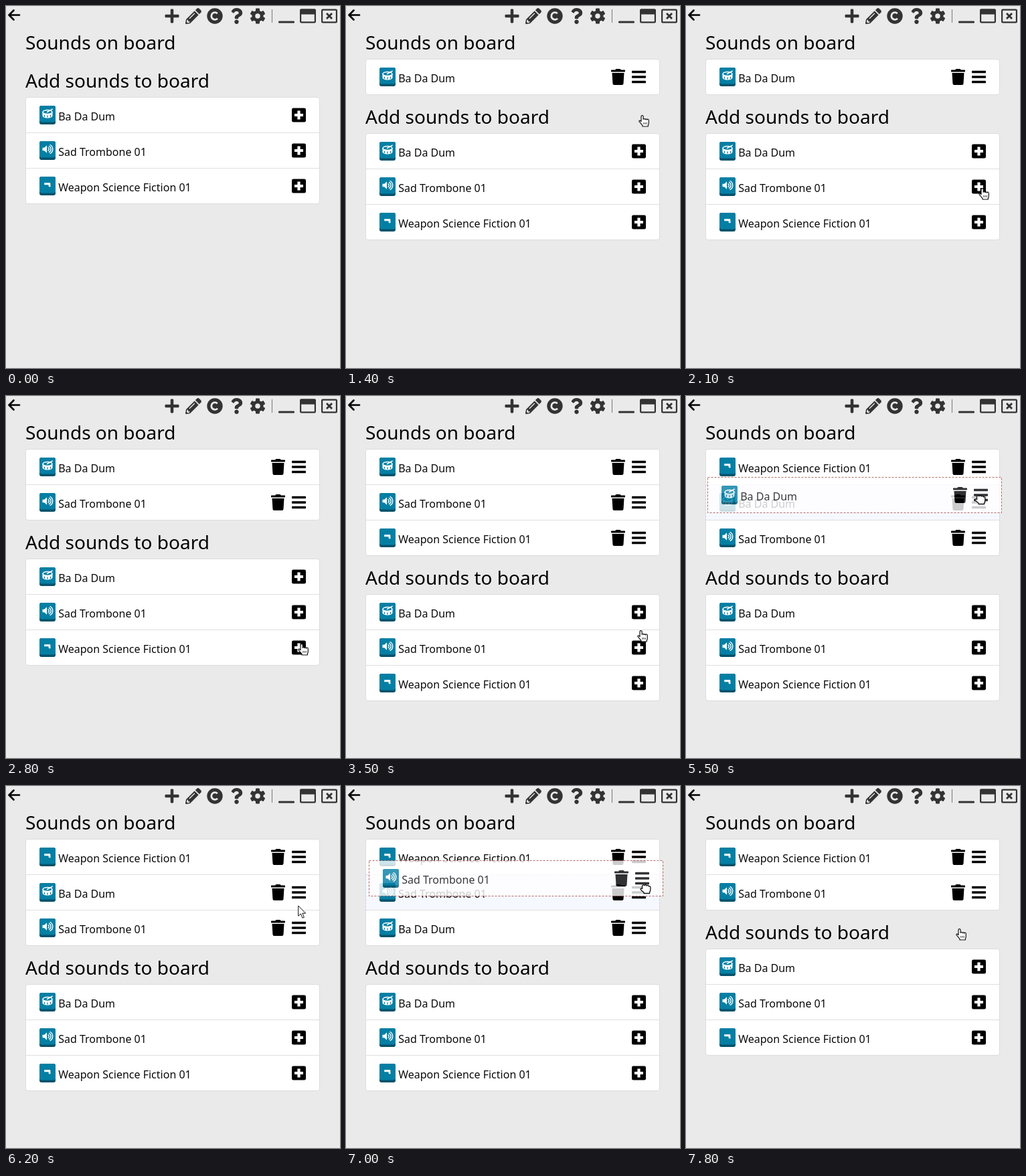
These frames come from a looping animation (499 by 541 pixels, 8 s). An HTML page:

```html
<!DOCTYPE html>
<html lang="en">
<head>
<meta charset="utf-8">
<title>Sound board</title>
<style>
html, body { margin: 0; width: 100%; height: 100%; overflow: hidden; background: #eaeaea; }
svg { display: block; width: 499px; height: 541px; }
text { font: 16px "Noto Sans", "Open Sans", sans-serif; fill: #0a0a0a; white-space: pre; }
.h { font-size: 28px; fill: #000; }
</style>
</head>
<body>
<svg viewBox="0 0 499 541">
  <defs>
    <g id="add">
      <rect y="1.5" width="21" height="21" rx="2.3"/>
      <path d="M8.4 5.5h4.2v4.4H17v4.2h-4.400v4.400H8.400v-4.400H4V9.900h4.400z" fill="#fff"/>
    </g>
    <g id="bars">
      <rect y="2.8" width="21" height="3.4" rx=".7"/>
      <rect y="10.3" width="21" height="3.4" rx=".7"/>
      <rect y="17.800" width="21" height="3.4" rx=".7"/>
    </g>
    <path id="trash" transform="scale(.046875)" d="M432 32H312l-9-19a24 24 0 0 0-22-13H167a24 24 0 0 0-22 13L136 32H16A16 16 0 0 0 0 48v32a16 16 0 0 0 16 16h416a16 16 0 0 0 16-16V48a16 16 0 0 0-16-16zM53 467a48 48 0 0 0 48 45h246a48 48 0 0 0 48-45L416 128H32z"/>

    <g id="tile">
      <rect width="24" height="28" rx="3" fill="#04526b"/>
      <rect width="24" height="24.500" rx="3" fill="#047fa4"/>
    </g>
    <g id="B">
      <use href="#tile"/>
      <path d="M4.500 9.500v5.500c0 2 3.500 3.500 7.500 3.500s7.500-1.500 7.500-3.500V9.500z" fill="#fff"/>
      <ellipse cx="12" cy="9.500" rx="7" ry="3" fill="#047fa4" stroke="#fff" stroke-width="1.400"/>
      <path d="M7.500 13.800v3M12 14.500v3M16.500 13.800v3" stroke="#047fa4" stroke-width="1.300"/>
      <path d="M11.500 9.500L19.300 5.200" stroke="#fff" stroke-width="1.500" stroke-linecap="round"/>
    </g>
    <g id="S">
      <use href="#tile"/>
      <path d="M4.500 9.800h2.800L11 6.300v11.400L7.300 14.200H4.500z" fill="#fff"/>
      <path d="M13 9.800a2.500 2.500 0 0 1 0 4.400M14.500 7.600a5 5 0 0 1 0 8.800M16 5.500a7.500 7.500 0 0 1 0 13" fill="none" stroke="#fff" stroke-width="1.400" stroke-linecap="round"/>
    </g>
    <g id="W">
      <use href="#tile"/>
      <path d="M7.200 9.200h9l.4 6h-2.600l-.6-3H7.200z" fill="#fff"/>
    </g>

    <path id="a" d="M.7 1V16.300L4.300 13 7 19.300 9.400 18.200 6.800 12.200H11.600z" fill="#fff" stroke="#111" stroke-linejoin="round"/>
    <g id="h" stroke="#111" stroke-linejoin="round">
      <path d="M4 2.200a1.600 1.600 0 0 1 3.200 0V6.400a1.400 1.400 0 0 1 2.700.3a1.400 1.400 0 0 1 2.700.5a1.400 1.400 0 0 1 2.700.8V12c0 1.500-.8 2.400-1 3.500V17H6V15.500C5 14 3 12 1.200 9.800C.3 8.500 1.800 7.500 2.900 8.500L4 9.600z" fill="#fff" stroke-width="1.200"/>
      <path d="M7.800 11v2.800M10 11v2.800M12.200 11v2.800" stroke-width=".8"/>
    </g>
    <path id="g" d="M3.500 2.600C3.700.6 6.300.3 6.900 1.800C7.600.3 9.800.4 10.300 2C11.200 1 13 1.400 13.300 2.800C14.600 2.200 15.800 3 15.800 4.500V8.500c0 1.500-1 2.200-1.200 3.200V13.500H6V12C4.300 10.600 2.500 9.500 1.300 7.800C.6 6.600 1.500 5.600 2.600 6l1 .6z" fill="#fff" stroke="#111" stroke-width="1.300" stroke-linejoin="round"/>
  </defs>

  <path d="M20 13.500H5M11.500 6.500l-7 7 7 7" fill="none" stroke="#000" stroke-width="2.700" stroke-linecap="round" stroke-linejoin="round"/>
  <g fill="#333">
    <rect x="237.500" y="12.800" width="21" height="4.500" rx="1.400"/>
    <rect x="245.750" y="4.500" width="4.500" height="21" rx="1.400"/>
    <g transform="translate(268 3) scale(.046875)">
      <path d="M498 142l-46 46q-9 8-17 0L324 77q-8-8 0-17l46-46q34-28 68 0l60 60q28 34 0 68zM284 100L22 362 0 484q0 30 28 28l122-22L412 228q8-8 0-17L301 100q-8-8-17 0z"/>
      <path d="M88 424h48v36l-64 12-32-32 12-64h36z" fill="#eaeaea"/>
      <path d="M134 330L288 176" stroke="#eaeaea" stroke-width="28" stroke-linecap="round"/>
    </g>
    <circle cx="312" cy="15" r="11.700"/>
    <path d="M316 18.600a5.300 5.300 0 1 1-.2-7.400" fill="none" stroke="#eaeaea" stroke-width="2.800"/>
    <path transform="translate(335.500 3) scale(.046875)" d="M202 0C122 0 70 33 30 91q-10 18 5 33l43 33q18 11 33-5c25-31 44-49 83-49 31 0 69 20 69 50 0 22-19 34-49 51-36 20-82 44-82 106v10q2 22 24 24h72q22-2 24-24v-6c0-43 126-44 126-160C378 66 287 0 202 0zM192 373a69 69 0 1 0 .1 0z"/>
    <g id="cog" transform="translate(376 15)">
      <circle r="8.600"/>
      <rect x="-3" y="-11.400" width="6" height="22.800" rx="1"/>
      <rect x="-3" y="-11.400" width="6" height="22.800" rx="1" transform="rotate(60)"/>
      <rect x="-3" y="-11.400" width="6" height="22.800" rx="1" transform="rotate(120)"/>
      <circle r="3.750" fill="#eaeaea"/>
    </g>
    <rect x="397" y="5" width="1" height="20" fill="#777"/>
    <rect x="407" y="22.500" width="24" height="3" rx="1.300"/>
    <rect x="439" y="4.500" width="24" height="8" rx="2"/>
    <g fill="none" stroke="#333" stroke-width="2.200">
      <rect x="440.100" y="5.600" width="21.800" height="18.800" rx="1.200"/>
      <rect x="472.100" y="5.600" width="21.800" height="18.800" rx="1.200"/>
      <path d="M479 11l8 8M487 11l-8 8" stroke-width="2.800"/>
    </g>
  </g>
  <text class="h" x="29" y="65">Sounds on board</text>
  <g id="board"></g>
  <g id="lower">
    <text class="h" x="29" y="122">Add sounds to board</text>
    <g id="pool"></g>
  </g>
  <g id="ghost"></g>
  <use id="cursor"/>
</svg>
<script>
const LOOP = 8000, STEP = 100, ROW = 53, TOP = 79;
const names = { B: "Ba Da Dum", S: "Sad Trombone 01", W: "Weapon Science Fiction 01" };

// time, sounds on the board
const boards = [
  [0, ""], [1400, "B"], [2200, "BS"], [2900, "BSW"],
  [4400, "BWS"], [5400, "WBS"], [6800, "WSB"], [7800, "WS"]
];

// first step, last step, pointer (arrow, hand, grab), end x, end y
const moves = [
  [0, 0, "", 467, 145],
  [700, 800, "a", 451, 155],
  [1100, 1200, "h", 437, 163],
  [1500, 1800, "h", 437, 269],
  [2000, 2100, "h", 437, 272],
  [2300, 2300, "h", 437, 275],
  [2500, 2800, "h", 436, 370],
  [3100, 3100, "h", 434, 369],
  [3500, 3500, "h", 435, 350],
  [3600, 3800, "a", 431, 232],
  [3900, 4000, "h", 427, 207],
  [4100, 4100, "g", 427, 209],
  [4200, 4300, "g", 425, 205],
  [4400, 4500, "g", 425, 153],
  [4600, 4600, "h", 425, 151],
  [4800, 4800, "h", 423, 145],
  [4900, 4900, "h", 424, 120],
  [5100, 5100, "h", 428, 104],
  [5200, 5200, "g", 428, 106],
  [5300, 5600, "g", 432, 162],
  [5700, 5700, "h", 432, 160],
  [5900, 6000, "a", 436, 171],
  [6200, 6200, "a", 436, 178],
  [6300, 6300, "h", 434, 215],
  [6500, 6500, "g", 434, 221],
  [6600, 7000, "g", 439, 147],
  [7100, 7100, "g", 438, 158],
  [7200, 7200, "h", 437, 164],
  [7300, 7300, "a", 435, 190],
  [7400, 7600, "h", 403, 213]
];

// start, drop, sound, home row, grab x, grab y
const drags = [
  [4100, 4600, "W", 2, 427, 209],
  [5200, 5700, "B", 0, 428, 106],
  [6500, 7200, "S", 2, 434, 221]
];

const $ = id => document.getElementById(id);
const lastIndex = (table, t) => table.findLastIndex(r => r[0] <= t);
const use = (id, x, y) => `<use href="#${id}" x="${x}" y="${y}"/>`;

function row(key, y, onBoard) {
  const tools = onBoard
    ? `<g transform="translate(396 ${y + 15})">${use("trash", 0, 0)}</g>` + use("bars", 427, y + 15)
    : use("add", 427, y + 15);
  return use(key, 50, y + 13) + `<text x="78.2" y="${y + 35}">${names[key]}</text>` + tools;
}

function list(keys, top, onBoard, held) {
  if (!keys) return "";
  let out = `<rect x="29.5" y="${top + .5}" width="439" height="${ROW * keys.length}" rx="3.5" fill="#fff" stroke="#dcdcdc"/>`;
  [...keys].forEach((key, i) => {
    const y = top + i * ROW;
    if (i) out += `<rect x="30" y="${y}" width="438" height="1" fill="#dfdfdf"/>`;
    if (key === held) out += `<rect x="29.5" y="${y + .5}" width="439" height="${ROW}" fill="#f6f8ff" stroke="#cdd2df" stroke-dasharray="3 2"/>`;
    out += row(key, y, onBoard);
  });
  return out;
}

function pointer(t) {
  const i = lastIndex(moves, t), [from, to, kind, x, y] = moves[i];
  const [, , , px, py] = moves[Math.max(0, i - 1)];
  const p = Math.min(1, (t - from + STEP) / (to - from + STEP));
  return { kind, x: Math.round(px + (x - px) * p), y: Math.round(py + (y - py) * p) };
}

function ghost(drag, at) {
  if (!drag) return "";
  const [, , key, home, gx, gy] = drag;
  return `<g opacity=".8" transform="translate(${at.x - gx} ${at.y - gy + TOP + home * ROW})">
    <rect x="29.5" y=".5" width="439" height="${ROW}" fill="#fff" stroke="#a04a44" stroke-dasharray="3 2"/>
    ${row(key, 0, true)}</g>`;
}

function draw(t) {
  const keys = boards[lastIndex(boards, t)][1];
  const drag = drags.find(d => t >= d[0] && t < d[1]);
  const at = pointer(t);
  $("board").innerHTML = list(keys, TOP, true, drag && drag[2]);
  $("lower").setAttribute("transform", `translate(0 ${keys ? keys.length * ROW + 1 : 0})`);
  $("ghost").innerHTML = ghost(drag, at);
  const c = $("cursor");
  c.setAttribute("href", at.kind ? "#" + at.kind : "");
  c.setAttribute("visibility", at.kind ? "visible" : "hidden");
  c.setAttribute("x", at.x);
  c.setAttribute("y", at.y);
}

$("pool").innerHTML = list("BSW", 136, false);
let shown = -1;
function tick() {
  const t = Math.floor(performance.now() % LOOP / STEP) * STEP;
  if (t !== shown) draw(shown = t);
  requestAnimationFrame(tick);
}
tick();
</script>
</body>
</html>
```
